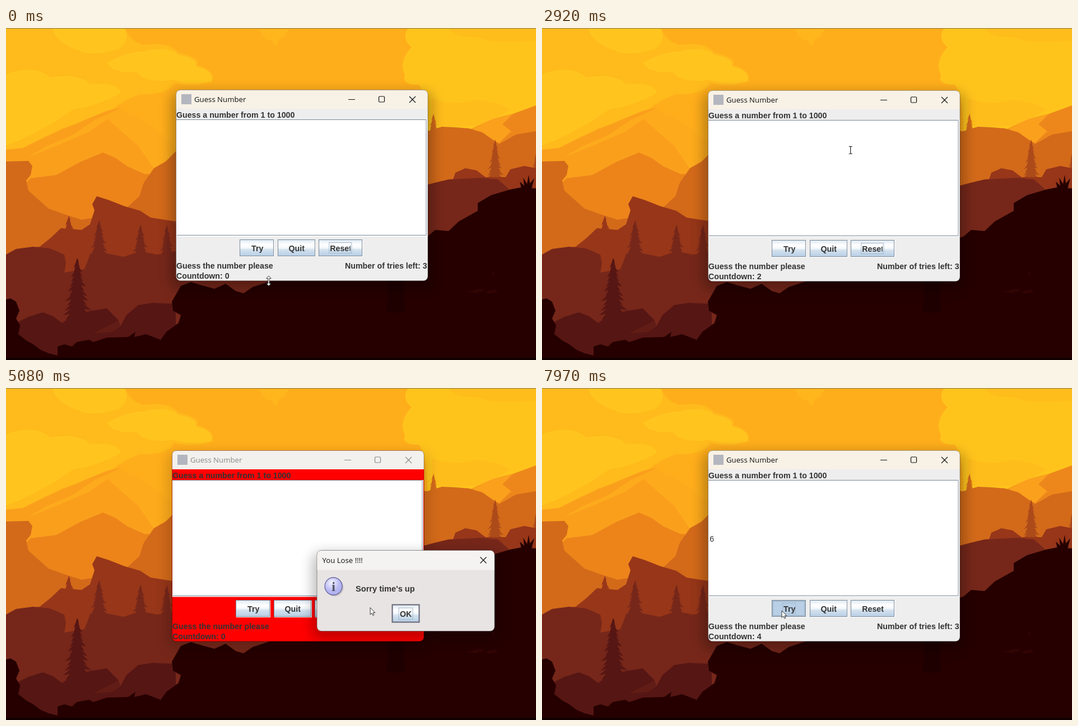
These frames come from a looping animation (946 by 592 pixels, 8 s). An HTML page:

```html
<!DOCTYPE html>
<html lang="en">
<head>
<meta charset="utf-8">
<title>Guess Number</title>
<style>
html, body { margin: 0; width: 100%; height: 100%; overflow: hidden; background: #260000 }
svg { display: block; width: 100vw; height: 100vh }
text { font: bold 14.2px "Liberation Sans", Arial, sans-serif; fill: #333; white-space: pre }
text.title { font: 13.2px "Open Sans", "Noto Sans", sans-serif; fill: #111 }
text.plain { font-weight: normal }
text.info { font: bold 24px "Liberation Serif", serif; fill: #556; text-anchor: middle }
.shadow { filter: blur(11px) }
.line { fill: none; stroke: #111; stroke-width: 1.2 }
.btn { fill: url(#metal); stroke: #7a8a99 }
.rim { fill: none; stroke: #fff }
.glow { fill: none; stroke: #a3b8cc; stroke-width: 2; visibility: hidden }
.hover .glow { visibility: visible }
.press .btn { fill: #b8cfe5 }
.focus { fill: none; stroke: #a3b8cc; visibility: hidden }
.focused .focus { visibility: visible }
#Reset.focused text { clip-path: inset(0 2.5px 0 0) }
.inactive text.title { fill: #888 }
.inactive .line, .closing .line { stroke: #888 }
.closing .content { display: none }
</style>
</head>
<body>
<svg viewBox="0 0 946 592">
  <defs>
    <linearGradient id="metal" x2="0" y2="1">
      <stop stop-color="#dde8f3"/><stop offset=".3" stop-color="#fff"/>
      <stop offset=".5" stop-color="#f4f8fb"/><stop offset=".62" stop-color="#d3e1ee"/>
      <stop offset="1" stop-color="#b8cfe5"/>
    </linearGradient>
    <radialGradient id="ball" cx=".4" cy=".3">
      <stop stop-color="#f2f2ff"/><stop offset="1" stop-color="#b4b4f2"/>
    </radialGradient>
  </defs>
  <g id="scene"></g>
  <g id="dialogBack"></g>
  <g id="win">
    <rect id="winShadow" class="shadow" x="-10" y="2" width="468" height="352" rx="16"/>
    <rect id="panel" x="-.5" y="-.5" width="449.5" height="340.3" rx="8" fill="#eee"/>
    <path id="bar" d="M-.5 33V7.5Q-.5 -.5 7.5 -.5H441Q449 -.5 449 7.5V33Z"/>
    <rect x="9" y="7" width="18" height="18" fill="#b3b6be"/>
    <text class="title" x="32" y="21">Guess Number</text>
    <path class="line" d="M307 16.5H319M416 11l11 11M427 11l-11 11"/>
    <rect class="line" x="361.5" y="11" width="10" height="10" rx="1.5"/>
    <text x="0" y="49">Guess a number from 1 to 1000</text>
    <path d="M0 52H448V260.5H0Z" fill="#fff"/>
    <path d="M0 52.5H446V258.5H1" fill="none" stroke="#7a8a99"/>
    <text id="entry" class="plain" x="2.2" y="162">6</text>
    <path id="caret" d="M2 146V164" stroke="#222" stroke-width="1.4"/>
    <g id="buttons"></g>
    <text x="0" y="317.5">Guess the number please</text>
    <text x="301" y="317.5">Number of tries left: 3</text>
    <text id="count" x="0" y="336"></text>
    <rect x="-.5" y="-.5" width="449.5" height="340.3" rx="8" fill="none" stroke="#000" stroke-opacity=".3"/>
  </g>
  <g id="dialogFront">
    <g id="dialog">
      <rect class="shadow" x="-167" y="-68" width="334" height="154" rx="16" opacity=".25"/>
      <rect x="-158.5" y="-72" width="317" height="144" rx="8" fill="#e8e4e4" stroke="#555" stroke-opacity=".6"/>
      <path d="M-158 -37V-64Q-158 -71.5 -150 -71.5H150Q158 -71.5 158 -64V-37Z" fill="#f5f3f2"/>
      <path class="line" d="M133 -60l11 11M144 -60l-11 11"/>
      <g class="content">
        <text class="title" x="-149" y="-50">You Lose !!!!</text>
        <circle cx="-127" cy="-6" r="16" fill="#000" opacity=".15"/>
        <circle cx="-129" cy="-8" r="15.5" fill="url(#ball)" stroke="#6666a0" stroke-width="1.3"/>
        <text class="info" x="-129" y="0">i</text>
        <text x="-89.5" y="1.5" style="font-size:14.6px">Sorry time's up</text>
        <g id="ok" class="focused">
          <rect class="btn" x="-24" y="25" width="48" height="31" style="stroke:#667;stroke-width:2"/>
          <rect class="focus" x="-12.5" y="30.5" width="25" height="21"/>
          <text x="-10.6" y="46">OK</text>
        </g>
      </g>
    </g>
  </g>
  <g id="cursor" stroke-linejoin="round">
    <path id="arrow" d="M0 0V12.5L2.9 9.8L4.9 14L6.8 13.1L4.9 9.1H8.8Z" fill="#fff" stroke="#222" stroke-width=".9"/>
    <path id="beam" d="M-3 -6.5H-1L0 -6L1 -6.5H3M0 -6V6M-3 6.5H-1L0 6L1 6.5H3" fill="none" stroke="#111" stroke-width="1.1"/>
    <path id="resize" d="M0 -9L4.2 -4.5H1.2V4.5H4.2L0 9L-4.2 4.5H-1.2V-4.5H-4.2Z" fill="#fff" stroke="#222" stroke-width=".9"/>
  </g>
</svg>
<script>
const $ = id => document.getElementById(id);
const scene = $('scene');
const shape = (fill, d, more = '') =>
  scene.insertAdjacentHTML('beforeend', `<path fill="${fill}" d="${d}" ${more}/>`);

// A fir: a zigzag that widens downwards, mirrored with uneven branches
function fir(fill, x, top, bottom, half, tiers) {
  const right = [], left = [];
  for (let i = 1; i <= tiers; i++) {
    const y = top + (bottom - top) * i / tiers;
    const w = half * (i / tiers) ** .8;
    const k = 1 + .18 * Math.sin(i * 2.4), m = 1 + .18 * Math.sin(i * 3.7);
    right.push(`${x + w * k} ${y}`, `${x + w * .55} ${y - 2}`);
    left.unshift(`${x - w * .55} ${y - 2}`, `${x - w * m} ${y + 1}`);
  }
  shape(fill, `M${x} ${top}L${right.join('L')}L${left.join('L')}Z`);
}

shape('#ffae1b', 'M0 0H946V592H0Z');
shape('#ffba1c', 'M0 0H212Q222 24 245 30Q292 24 308 44Q350 54 340 66Q376 76 368 96Q335 106 300 98Q290 120 240 118Q210 128 190 145L0 240Z');
shape('#ffc51e', 'M82 0H212Q222 24 200 38Q150 52 130 40Q90 28 82 0ZM180 62Q215 42 245 42Q290 30 308 48Q346 56 338 68Q374 78 366 95Q325 102 300 92Q250 100 232 78Q190 82 180 62ZM0 82Q50 65 80 88Q130 80 150 100Q200 96 205 116Q160 140 120 145Q70 182 0 210Z');
shape('#ffc41c', 'M718 0Q705 20 724 34Q700 60 712 84Q706 102 736 101Q752 115 752 190H946V0Z');
shape('#ffb81c', 'M790 0Q800 18 840 16Q870 30 946 22V0ZM760 125Q800 140 840 128Q880 130 900 146L850 175H760Z', 'opacity=".5"');
shape('#ffbf1d', 'M452 3H505L496 16L486 20L482 34L474 22L463 20Z', 'opacity=".45"');

// Far peaks
shape('#fa9f1c', 'M0 217L30 214L52 203L100 180L122 172L150 160L180 148L203 142L214 152L232 157L262 176L303 212V320H0Z');
shape('#ffb31d', 'M203 143L190 150L160 163L120 190L70 212L40 230L100 206L150 184L182 162L206 184L236 210L266 254L303 226V212L262 176L232 157L214 152Z', 'opacity=".65"');
shape('#ec841a', 'M20 290L44 268L90 262L130 240L173 222L196 232L215 246L246 260L270 262V400H0Z');
shape('#ee871b', 'M730 195L790 182L830 180L870 162L905 153L946 138V230H730Z');
shape('#faa01d', 'M832 180L872 161L892 156L905 153L886 172L902 184L880 205L850 190Z');
// Mid hills
shape('#d36a1a', 'M0 238L40 237L47 246L44 262L36 272L40 290L58 306L76 322L104 332L135 342L158 338L200 335L238 300L246 276L264 250L285 238L303 220L420 180H700L752 184L778 176L800 177L826 179L850 186L880 207L910 190L946 184V420H0Z');
fir('#d36a1a', 763, 153, 185, 8, 6);
fir('#ac4a19', 873, 199, 268, 14, 12);
fir('#ac4a19', 946, 224, 252, 6, 5);
shape('#973619', 'M0 404L30 394L60 390L80 374L98 357L135 360L150 350L158 325L154 314L162 300L184 307L212 318L240 326L258 338L303 345L700 300L752 288L798 270L802 258L820 250L840 254L856 266L892 266L900 252L925 246L946 250V480H0Z');
fir('#973619', 112, 335, 400, 17, 8);
// Dark hills
shape('#76271a', 'M0 404L18 394L48 390L78 393L104 404L107 420L104 436L140 430L150 404L180 402L210 408L240 398L270 404L303 398L700 300L735 284L765 276L790 270L830 268L850 267L878 270L894 284L910 300V592H0Z');
fir('#76271a', 166, 343, 412, 17, 10);
fir('#76271a', 240, 351, 412, 15, 9);
fir('#76271a', 287, 351, 410, 13, 9);
shape('#561613', 'M18 526L40 515L66 507L84 514L100 526L124 510L154 504L180 500L200 520L204 532L215 512L236 494L262 490L303 492V592H18Z');
fir('#561613', 127, 410, 520, 25, 13);
shape('#6b2018', 'M155 545L200 522L204 532L190 542Z', 'opacity=".6"');
// Foreground
shape('#260000', 'M0 484L8 482L18 488L24 504L18 518L25 530L22 546L36 557L50 565L62 574L76 580L92 584V568L104 564L118 568L126 560L148 556L156 560L180 552L218 551L231 542L229 551L250 546L276 556L286 542L308 526L312 512L298 504L296 488L304 474L312 460L330 453L350 459L372 465L392 456L410 469L424 473L440 462L470 452L752 372L766 360L790 362L808 345L842 326V312L866 298L900 288L920 284L946 286V592H0Z');
shape('#260000', 'M920 286L917 274L925 281L923 267L930 278L933 262L935 277L943 268L938 287Z');
shape('#1f0000', 'M682 440H710L712 508H680Z');
shape('#390706', 'M822 470l24 -5l10 3l-18 5ZM856 470l16 -4l6 4l-16 4ZM868 436l3 -1v8h-2Z', 'opacity=".7"');
shape('#8d7a58', 'M0 0H946V1H0Z');
shape('#120000', 'M0 588H946V592H0Z');

// Buttons: label, left, width, text x, focus width
const buttons = [['Try', 113.5, 60, 134, 23], ['Quit', 181.5, 66, 200.5, 29], ['Reset', 254.5, 77, 274.3, 40]];
$('buttons').innerHTML = buttons.map(([label, x, w, tx, fw]) => `<g id="${label}">
  <rect class="rim" x="${x + 1}" y="267.5" width="${w}" height="29"/>
  <rect class="btn" x="${x}" y="266.5" width="${w}" height="29"/>
  <rect class="glow" x="${x + 1.5}" y="268" width="${w - 3}" height="26"/>
  <text x="${tx}" y="287.3">${label}</text>
  <rect class="focus" x="${tx - 1.5}" y="271.5" width="${fw}" height="19"/></g>`).join('');

// Key rows are [time, values...], joined by straight lines
function along(keys, t) {
  if (t <= keys[0][0]) return keys[0].slice(1);
  for (let i = 1; i < keys.length; i++) {
    const a = keys[i - 1], b = keys[i];
    if (t < b[0]) return a.slice(1).map((v, j) => v + (b[j + 1] - v) * (t - a[0]) / (b[0] - a[0]));
  }
  return keys[keys.length - 1].slice(1);
}
const step = (rows, t) => rows.filter(r => t >= r[0]).pop()[1];

const winPath = [[1960, 304, 111], [2320, 282, 111], [2350, 282, 111], [2560, 297, 112]];
const mousePath = [
  [0, 469, 451], [30, 467, 452], [150, 465, 452], [1540, 465, 451], [1900, 534, 127], [1960, 534, 127],
  [2320, 512, 127], [2350, 512, 127], [2560, 527, 128], [2710, 527, 128], [2950, 554, 230], [3220, 510, 385],
  [3380, 478, 352], [3490, 476, 340], [3700, 455, 380], [3920, 440, 391], [4650, 440, 391],
  [4900, 570, 385], [5230, 716, 397], [5620, 716, 397], [6060, 590, 392], [6230, 590, 392],
  [6470, 427, 271], [7400, 427, 271], [7790, 428, 397]];
const dialogPath = [
  [4530, .86, 0], [4560, .88, .6], [4590, .91, .94], [4680, .98, 1], [4740, 1, 1],
  [5500, 1, 1], [5560, .96, .8], [5650, .9, 0]];
const digits = [[0, 0], [620, 4], [1600, 3], [2560, 2], [3520, 1], [4500, 0], [7140, 4]];

function draw(t) {
  const [wx, wy] = along(winPath, t);
  const [mx, my] = along(mousePath, t);
  const [scale, alpha] = along(dialogPath, t);
  const lost = t >= 4500 && t < 6160;
  const inactive = t >= 4560 && t < 5500;
  const show = (id, on) => $(id).style.visibility = on ? 'visible' : 'hidden';

  $('win').setAttribute('transform', `translate(${wx} ${wy})`);
  $('win').classList.toggle('inactive', inactive);
  $('winShadow').setAttribute('opacity', inactive ? .14 : .26);
  $('panel').setAttribute('fill', lost ? '#f00' : '#eee');
  $('bar').setAttribute('fill', inactive ? '#f3f1ed' : lost ? '#f9f9f8' : '#f8f1e6');
  $('count').textContent = 'Countdown: ' + step(digits, t);

  const typed = t >= 7460;
  show('entry', typed);
  show('caret', t >= 6470 && t < 6960 || typed && t < 7970);
  $('caret').setAttribute('transform', `translate(${typed ? 8 : 0} 0)`);

  const lx = mx - wx, ly = my - wy;
  for (const [label, x, w] of buttons) {
    const over = lx > x && lx < x + w && ly > 266 && ly < 296 && (t < 4650 || t > 5650);
    const down = label == 'Try' && t >= 7970 || label == 'Reset' && t >= 6100 && t < 6160;
    const list = $(label).classList;
    list.toggle('hover', over);
    list.toggle('press', down);
    list.toggle('focused', label == 'Reset' && t < 6470 || label == 'Try' && t >= 7970);
  }

  const dialog = $('dialog'), home = $(t < 5500 ? 'dialogFront' : 'dialogBack');
  if (dialog.parentNode != home) home.append(dialog);
  dialog.setAttribute('transform', `translate(713.5 ${t < 5500 ? 361.5 : 363}) scale(${scale})`);
  dialog.setAttribute('opacity', alpha);
  dialog.classList.toggle('closing', t >= 5500);
  $('ok').classList.toggle('press', t >= 5410);

  const inField = ly > 52 && ly < 258 && !inactive;
  const atEdge = ly > 335;
  show('beam', inField);
  show('resize', atEdge);
  show('arrow', !inField && !atEdge);
  $('cursor').setAttribute('transform', `translate(${mx} ${my})`);
}

function tick() {
  draw(performance.now() % 8000);
  requestAnimationFrame(tick);
}
tick();
</script>
</body>
</html>
```
